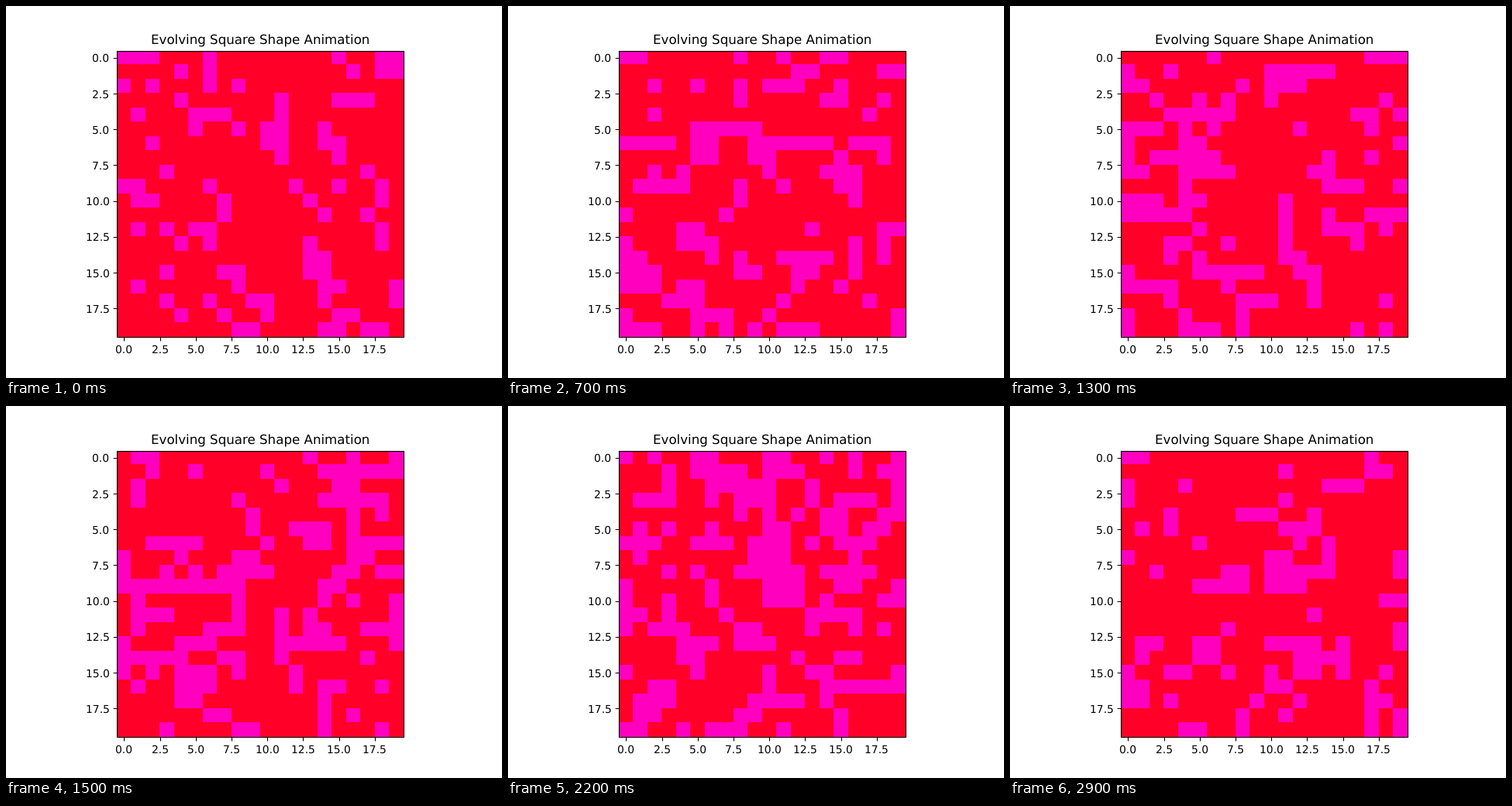
Animation, 640 px wide and 480 px high, one loop 3 s. Source, as an HTML page with a canvas:

```html
<!DOCTYPE html>
<html lang="en">
<head>
<meta charset="utf-8">
<title>Evolving Square Shape Animation</title>
<style>
  html, body { margin: 0; height: 100%; overflow: hidden; background: #fff; }
  canvas { display: block; }
</style>
</head>
<body>
<canvas id="stage" width="640" height="480"></canvas>
<script>
const ctx = document.getElementById('stage').getContext('2d');
const SIZE = 20, LEFT = 143.2, TOP = 57.6, SPACING = 18.48;
const LOOP = 3000, STEP = 100, COPY = .14;
const RED = '#ff0028', MAGENTA = '#ff00bf';

// Share of magenta cells over the loop: [step, density]
const DENSITY = [[0, .23], [4, .295], [10, .31], [15, .365], [19, .34], [24, .39], [29, .27]];

// Cells alternate between 18 and 19 pixels
const edgeX = col => Math.floor(143 + col * 18.5);
const edgeY = row => Math.floor(57 + row * 18.5);

function densityAt(step) {
  const next = Math.max(1, DENSITY.findIndex(([s]) => s >= step));
  const [s0, d0] = DENSITY[next - 1], [s1, d1] = DENSITY[next];
  return d0 + (d1 - d0) * (step - s0) / (s1 - s0);
}

function randomFrom(seed) {
  return () => {
    seed = (seed + 0x6D2B79F5) | 0;
    let n = Math.imul(seed ^ (seed >>> 15), seed | 1);
    n ^= n + Math.imul(n ^ (n >>> 7), n | 61);
    return ((n ^ (n >>> 14)) >>> 0) / 4294967296;
  };
}

// Random cells that sometimes copy a neighbour, which forms small clusters
function makeGrid(step) {
  const random = randomFrom(step * 7919 + 17), density = densityAt(step);
  const grid = [];
  for (let row = 0; row < SIZE; row++) {
    grid.push([]);
    for (let col = 0; col < SIZE; col++) {
      const pick = random(), fresh = random() < density;
      if (pick < COPY && col) grid[row].push(grid[row][col - 1]);
      else if (pick > 1 - COPY && row) grid[row].push(grid[row - 1][col]);
      else grid[row].push(fresh);
    }
  }
  return grid;
}

// Text starts on a whole pixel; align is the share of its width left of x
function drawText(text, x, y, align) {
  const width = ctx.measureText(text).width;
  ctx.fillText(text, Math.round(x - width * align), Math.round(y));
}

function drawAxes() {
  ctx.fillStyle = '#fff';
  ctx.fillRect(0, 0, 640, 480);
  ctx.fillStyle = '#000';
  ctx.lineWidth = 10 / 9;
  ctx.textRendering = 'geometricPrecision';
  ctx.font = '16.667px "DejaVu Sans", sans-serif';
  drawText('Evolving Square Shape Animation', 328, 49, .5);

  ctx.font = '13.889px "DejaVu Sans", sans-serif';
  ctx.beginPath();
  for (let value = 0; value < SIZE; value += 2.5) {
    const offset = (value + .5) * SPACING, label = value.toFixed(1);
    const x = LEFT + offset, y = TOP + offset;
    drawText(label, x, 448, .5);
    drawText(label, 133.48, y + 5.5, 1);
    ctx.moveTo(Math.round(x) + .5, 427.5);
    ctx.lineTo(Math.round(x) + .5, 432.4);
    ctx.moveTo(143.5, Math.round(y) + .5);
    ctx.lineTo(138.6, Math.round(y) + .5);
  }
  ctx.stroke();
}

function drawGrid(grid) {
  ctx.save();
  ctx.beginPath();
  ctx.rect(143, 58, 370, 369);
  ctx.clip();
  ctx.fillStyle = RED;
  ctx.fillRect(143, 58, 370, 369);
  ctx.fillStyle = MAGENTA;
  grid.forEach((cells, row) => cells.forEach((on, col) => {
    const x = edgeX(col), y = edgeY(row);
    if (on) ctx.fillRect(x, y, edgeX(col + 1) - x, edgeY(row + 1) - y);
  }));
  ctx.restore();
  ctx.strokeRect(143.5, 58.5, 370, 369);
}

let shown = -1;
function render() {
  const step = Math.floor(performance.now() % LOOP / STEP);
  if (step !== shown) {
    shown = step;
    drawAxes();
    drawGrid(makeGrid(step));
  }
  requestAnimationFrame(render);
}
render();
</script>
</body>
</html>
```
